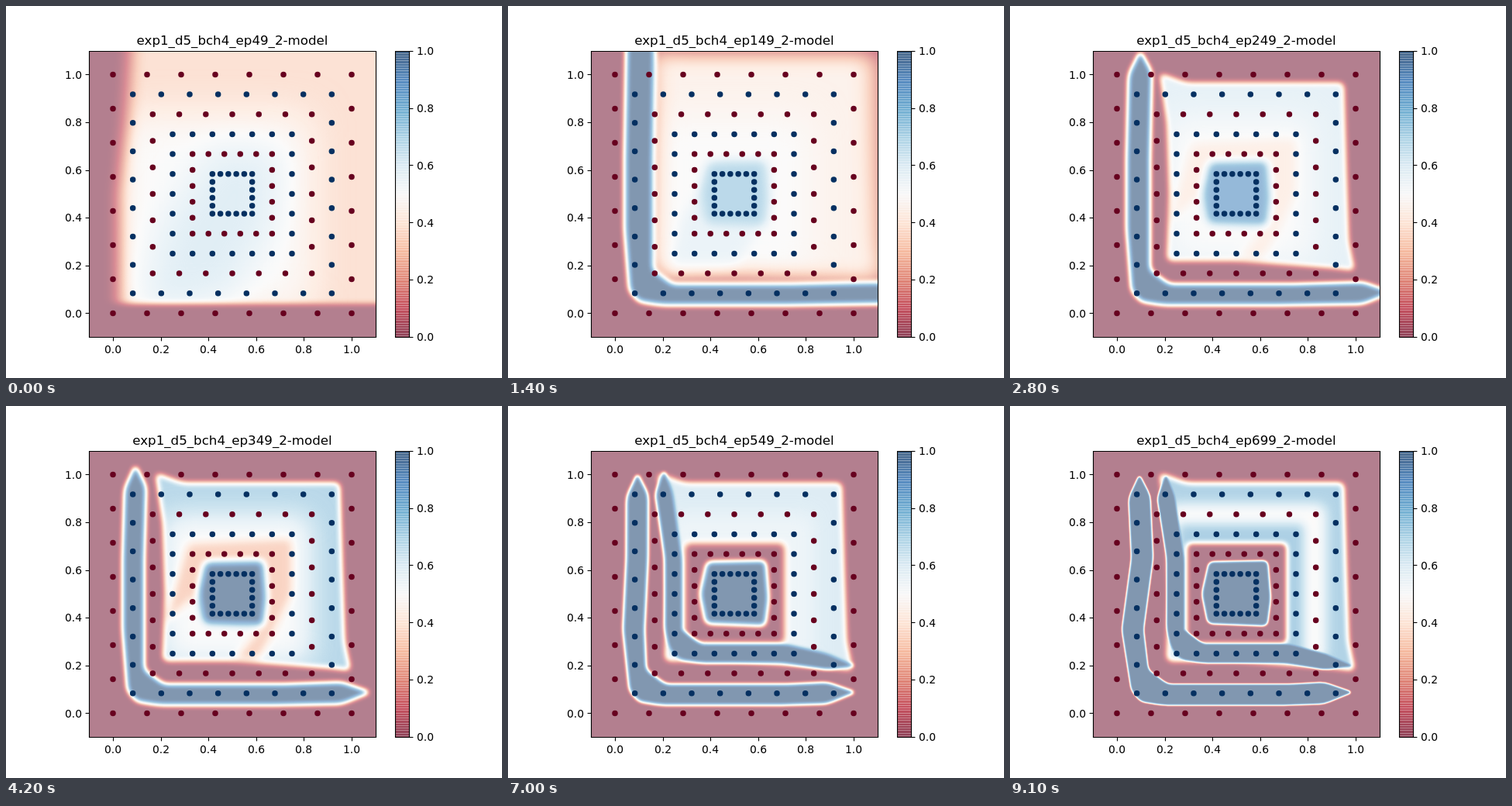
Recreate the animation shown at these times as an HTML page. Size 640 px wide and 480 px high, loop 9800 ms.

```html
<!DOCTYPE html>
<html lang="en">
<head>
<meta charset="utf-8">
<title>Decision field</title>
<style>
  html, body { margin: 0; width: 100%; height: 100%; overflow: hidden; background: #fff; }
  svg { display: block; width: 640px; height: 480px; }
  text { font: 13.89px "DejaVu Sans", sans-serif; fill: #000; }
  #title { font-size: 16.67px; }
  .line { fill: none; stroke: #000; stroke-width: 1.11; }
</style>
</head>
<body>
<svg viewBox="0 0 640 480">
  <defs id="defs">
    <filter id="map" filterUnits="userSpaceOnUse" x="107" y="58" width="370" height="370" color-interpolation-filters="sRGB">
      <feComponentTransfer id="transfer"/>
    </filter>
    <mask id="areaMask" maskUnits="userSpaceOnUse" x="0" y="0" width="640" height="480"></mask>
  </defs>
  <rect width="640" height="480" fill="#fff"/>
  <g filter="url(#map)">
    <rect width="640" height="480" fill="#000"/>
    <g id="inside" mask="url(#areaMask)"></g>
    <g id="bands"></g>
  </g>
  <g id="dots"></g>
  <g id="bar" shape-rendering="crispEdges"></g>
  <g id="axes"></g>
  <text id="title" x="292" y="49.5" text-anchor="middle"></text>
</svg>
<script>
const STEP = 700, STEPS = 14;
const LEFT = 107.2, TOP = 57.6, SIZE = 369.6, BOTTOM = TOP + SIZE, UNIT = SIZE / 1.2;
const px = u => LEFT + (u + 0.1) * UNIT;
const py = v => BOTTOM - (v + 0.1) * UNIT;
const $ = id => document.getElementById(id);
const mix = (a, b, t) => a + (b - a) * t;
const linear = (a, b, s) => Math.min(1, Math.max(0, (s - a) / (b - a)));
const ease = (a, b, s) => { const t = linear(a, b, s); return t * t * (3 - 2 * t); };

function add(parent, tag, attrs, text) {
  const el = document.createElementNS('http://www.w3.org/2000/svg', tag);
  for (const k in attrs) el.setAttribute(k, attrs[k]);
  if (text !== undefined) el.textContent = text;
  parent.appendChild(el);
  return el;
}

// Diverging red-white-blue map
const ramp = '67001f b2182b d6604d f4a582 fddbc7 f7f7f7 d1e5f0 92c5de 4393c3 2166ac 053061'
  .split(' ').map(h => [0, 2, 4].map(i => parseInt(h.slice(i, i + 2), 16)));

function colour(v) {
  const x = v * 10, i = Math.min(9, Math.floor(x));
  return 'rgb(' + ramp[i].map((c, j) => Math.round(mix(c, ramp[i + 1][j], x - i))) + ')';
}

// The field is painted in grey and mapped at half opacity over white.
['R', 'G', 'B'].forEach((c, j) => add($('transfer'), 'feFunc' + c, {
  type: 'table',
  tableValues: ramp.map(rgb => ((rgb[j] + 255) / 510).toFixed(4)).join(' ')
}));

// Closed outline in data units with rounded corners
function outline(points, radius = 7) {
  const p = points.map(([u, v]) => [px(u), py(v)]);
  const toward = (a, b) => {
    const t = Math.min(0.5, radius / Math.hypot(b[0] - a[0], b[1] - a[1]));
    return [mix(a[0], b[0], t), mix(a[1], b[1], t)];
  };
  return p.map((a, i) => {
    const before = toward(a, p[(i + p.length - 1) % p.length]);
    const after = toward(a, p[(i + 1) % p.length]);
    return `${i ? 'L' : 'M'}${before}Q${a} ${after}`;
  }).join('') + 'Z';
}

const box = (x0, y0, x1, y1) => [[x0, y0], [x0, y1], [x1, y1], [x1, y0]];

// L-shaped band: bend shifts both ends, lean tilts the upright
function band({ x0, x1, y0, y1, top, right, bend, lean }) {
  const tipX = (x0 + x1) / 2 + bend, tipY = (y0 + y1) / 2 + bend * 1.3;
  return [
    [tipX, top], [x1 + bend, top - 0.09], [x1 + lean, 0.65], [x1 - lean, 0.35],
    [x1, y1 + 0.06], [x1 + 0.08, y1], [0.72, y1],
    [right - 0.12, y1 + bend], [right, tipY], [right - 0.12, y0 + bend * 0.7],
    [0.7, y0], [x0 + 0.15, y0], [x0 + 0.06, y0 + 0.015], [x0 + 0.02, y0 + 0.06],
    [x0 - lean, 0.35], [x0 + lean, 0.65], [x0 + bend, top - 0.1]
  ];
}

const opening = s => (1 - linear(0, 4, s)) ** 1.5;
const lull = s => Math.exp(-(((s - 10) / 1.6) ** 2));
const sharpen = s => 4.4 - 0.24 * s;

// Painted in order; each rule gives the part at a training step.
const rules = {
  area(s) {
    const o = opening(s), c = 1 - o, swell = 10 * Math.sin(Math.PI * linear(0, 4, s));
    const left = 0.21 - 0.18 * o, low = 0.22 - 0.18 * o;
    const top = 0.965 + 0.34 * o, right = 0.96 + 0.39 * o;
    return {
      points: [
        [left - 0.03 * c + 0.06 * o, top + 0.04 * c], [left + 0.08, top], [right - 0.01, top],
        [right, 0.6], [right + 0.01, 0.3], [right + 0.035, low - 0.04 * c],
        [right - 0.06, low - 0.03 * c], [0.5, low], [left, low], [left + 0.01 * c, 0.5], [left + 0.03 * o, 0.8]
      ],
      blur: [3.5 + 6.5 * o + swell, 3.5 + swell]
    };
  },
  base: s => ({
    points: box(-1, -1, 2, 2), blur: 1,
    value: mix(0.36, 0.76, ease(0, 7, s)) - 0.13 * lull(s)
  }),
  pale(s) {
    const lo = 0.22 - 0.2 * opening(s), hi = 0.82 + 0.05 * ease(9, 13, s);
    return {
      points: box(lo, lo, hi, hi), blur: 26 - 1.4 * s,
      value: 0.5 - 0.02 * ease(10, 13, s), alpha: 1 - 0.5 * lull(s)
    };
  },
  glow(s) {
    const k = 1 - 0.14 * s;
    const blob = [[-0.4, -0.5], [-0.3, -0.1], [-0.08, 0.22], [0.2, 0.2], [0.18, -0.1], [0, -0.42]];
    return {
      points: blob.map(([x, y]) => [0.5 + k * x, 0.48 + k * y]),
      blur: Math.max(8, 22 - 7 * s), value: 0.62 - 0.02 * s, alpha: 1 - ease(2, 4, s)
    };
  },
  halo: s => ({
    points: box(0.25, 0.2, 0.79, 0.8), blur: 7, value: 0.77, alpha: ease(10, 13, s)
  }),
  ring(s) {
    const k = 1 - ease(6, 8, s), lo = 0.292, hi = 0.712;
    return {
      points: [
        [lo - 0.08 * k, 0.5 - 0.13 * k], [lo + 0.02 * k, hi], [hi + 0.04 * k, hi + 0.02 * k],
        [hi + 0.04 * k, 0.5], [hi - 0.1 * k, lo - 0.07 * k], [0.5, lo - 0.07 * k],
        [0.5 + 0.12 * k, lo + 0.065 * k], [lo + 0.05 * k, lo + 0.2 * k]
      ],
      blur: 8 - 0.35 * s, value: 0.42 * (1 - ease(4, 10, s)), alpha: ease(2, 4, s)
    };
  },
  core: s => ({
    points: [[0.385, 0.635], [0.632, 0.64], [0.645, 0.48], [0.63, 0.365], [0.38, 0.375], [0.355, 0.5]],
    blur: 7 - 0.4 * s, value: mix(0.6, 1, linear(0, 6, s)), alpha: linear(0, 2, s)
  }),
  inner: s => ({
    points: band({
      x0: 0.208, x1: 0.282, y0: 0.21, y1: 0.29,
      top: 1.08 - 0.006 * s, right: 1.07 - 0.006 * s, bend: -0.04, lean: 0
    }),
    blur: sharpen(s), alpha: ease(6, 8, s)
  }),
  outer: s => ({
    points: band({
      x0: 0.04, x1: 0.16 - 0.028 * ease(2, 5, s), y0: 0.033, y1: 0.122,
      top: 1 + 0.25 * Math.exp((2 - s) / 2.2), right: 0.97 + 0.3 * Math.exp((2 - s) / 4),
      bend: 0.008, lean: 0.02 * ease(8, 13, s)
    }),
    blur: sharpen(s), alpha: linear(0, 2, s)
  })
};

const hosts = { area: 'areaMask', inner: 'bands', outer: 'bands' };
const parts = Object.entries(rules).map(([name, rule]) => {
  const filter = add($('defs'), 'filter', {
    id: 'blur-' + name, filterUnits: 'userSpaceOnUse', x: -200, y: -200,
    width: 1040, height: 880, 'color-interpolation-filters': 'sRGB'
  });
  return {
    rule,
    soft: add(filter, 'feGaussianBlur', {}),
    shape: add($(hosts[name] || 'inside'), 'path', { filter: `url(#blur-${name})` })
  };
});

// Six nested squares of samples, alternating class
for (let ring = 0; ring < 6; ring++) {
  const n = 7 - Math.floor(ring / 2), lo = ring / 12, at = i => mix(lo, 1 - lo, i / n);
  for (let i = 0; i <= n; i++) for (let j = 0; j <= n; j++) {
    if (i % n && j % n) continue;
    add($('dots'), 'circle', { cx: px(at(i)), cy: py(at(j)), r: 3.75, fill: ring % 2 ? '#053061' : '#67001f' });
  }
}

// Translucent cells overlap by one pixel row
const rowAt = i => Math.round(BOTTOM - SIZE * i / 256);
for (let i = 0; i < 256; i++) {
  const y = rowAt(i + 1);
  add($('bar'), 'rect', {
    x: 502, y, width: 19, height: Math.min(428, rowAt(i) + 1) - y,
    fill: colour(i / 255), 'fill-opacity': 0.5
  });
}

const snap = v => Math.floor(v + 0.5) + 0.5;
const line = d => add($('axes'), 'path', { d, class: 'line' });
const label = (x, y, s) => add($('axes'), 'text', { x: Math.round(x), y: Math.round(y) }, s);
line('M107.5 58.5H477.5V427.5H107.5Z');
line('M502.5 58.5H520.5V427.5H502.5Z');
for (let i = 0; i <= 5; i++) {
  const v = i / 5, s = v.toFixed(1), x = px(v), y = py(v), b = BOTTOM - SIZE * v;
  line(`M${snap(x)} 427.5v4.9`);
  line(`M107.5 ${snap(y)}h-4.9`);
  line(`M520.5 ${snap(b)}h4.9`);
  label(x - 11.05, 448, s);
  label(75.6, y + 5.2, s);
  label(530.2, b + 5.2, s);
}

function draw(step) {
  $('title').textContent = `exp1_d5_bch4_ep${49 + 50 * step}_2-model`;
  for (const { rule, soft, shape } of parts) {
    const { points, blur, value = 1, alpha = 1 } = rule(step);
    const g = Math.round(value * 255);
    soft.setAttribute('stdDeviation', [].concat(blur).join(' '));
    shape.setAttribute('d', outline(points));
    shape.setAttribute('fill', `rgb(${g},${g},${g})`);
    shape.setAttribute('fill-opacity', alpha);
  }
}

let shown = -1;
const start = performance.now();
function tick() {
  const step = Math.floor((performance.now() - start) / STEP) % STEPS;
  if (step !== shown) draw(shown = step);
  requestAnimationFrame(tick);
}
tick();
</script>
</body>
</html>
```
